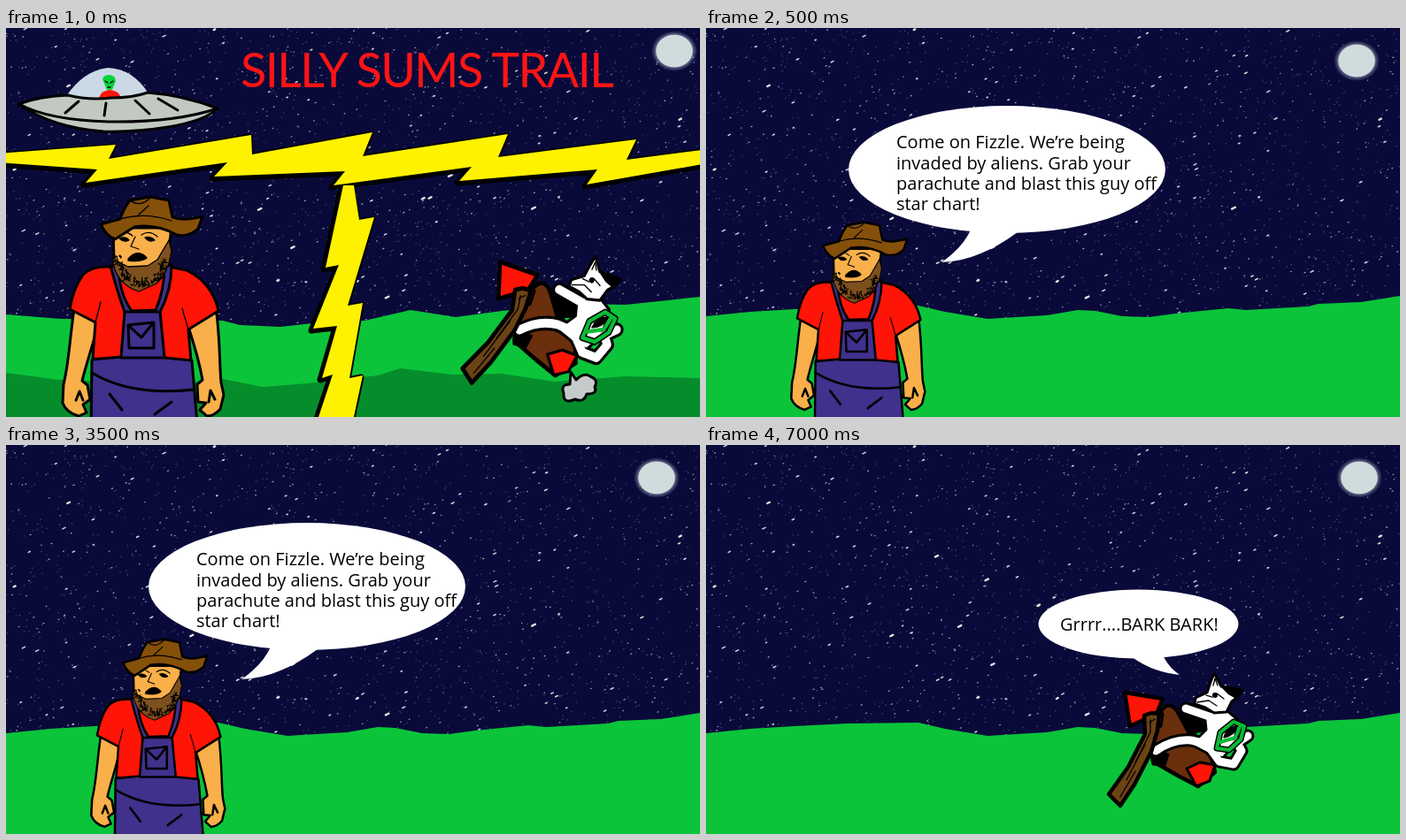
These frames come from a looping animation (784x440 px, 8 s). An HTML page:

```html
<!DOCTYPE html>
<html lang="en">
<head>
<meta charset="utf-8">
<title>Space cartoon</title>
<style>
  html, body { margin: 0; width: 100%; height: 100%; overflow: hidden; background: #0a0a3a; }
  svg { display: block; width: 100vw; height: 100vh; }
  .ink, .line { stroke: #000; stroke-width: 3; stroke-linejoin: round; stroke-linecap: round; }
  .line { fill: none; }
  .thin { stroke-width: 1.3; }
  .bold { stroke-width: 4.5; }
  .skin { fill: #f9b04a; }
  .shirt { fill: #ff1408; }
  .denim { fill: #3f318c; }
  .hat { fill: #855009; }
  .wood { fill: #6b4315; }
  .hull { fill: #6a2f0d; }
  .fur { fill: #fff; }
  .grass { fill: #0bc43a; }
  .speech { font: 20px "Open Sans", sans-serif; fill: #000; }
  .title { font: 54px Lato, sans-serif; letter-spacing: -1.6px; fill: #ff1414; }
</style>
</head>
<body>
<svg viewBox="0 0 784 440">
  <defs>
    <radialGradient id="glow">
      <stop offset=".78" stop-color="#cfdcdd"/>
      <stop offset=".82" stop-color="#a9b6c4" stop-opacity=".5"/>
      <stop offset="1" stop-color="#8792b0" stop-opacity="0"/>
    </radialGradient>

    <g id="sky">
      <rect width="784" height="440" fill="#0a0a3a"/>
      <g id="stars" fill="none" stroke-linecap="round"></g>
    </g>
    <ellipse id="moon" rx="26" ry="23" fill="url(#glow)"/>
    <path id="hills" class="grass" d="M0 326L50 321 100 318 160 315 240 314 270 321 318 329 350 327 385 325 420 319 440 320 470 326 500 327 530 323 590 317 610 319 680 315 692 312 740 310 784 303V440H0Z"/>

    <g id="bolt">
      <path d="M-9 142L124 132 116 148 277 121 278 143 414 118 403 145 567 120 556 146 712 126 701 149 793 137V153L656 177 668 160 512 173 526 157 370 178 383 162 235 168 250 152 90 175 103 160 -9 152Z"/>
      <path d="M381 178H393L399 217 416 214 386 314 403 311 388 396 403 393 391 449H350L369 392 357 396 374 337 347 340 376 268 361 271Z"/>
    </g>

    <g id="farmer" class="ink">
      <path class="skin" d="M77 318C72 350 71 380 65 403L64 424Q68 435 82 439L91 435 87 426 95 420 92 404 86 399C92 375 99 357 105 330Z"/>
      <path class="skin" d="M237 316C242 350 241 380 243 401L246 415 242 431Q235 439 227 439L219 432 226 424 217 423 216 403 222 398C218 376 213 359 205 335Z"/>
      <path class="line" d="M79 421L83 411 87 421M229 423L231 410 236 420"/>
      <path class="shirt" d="M124 271Q99 267 87 279 76 294 72 318L101 333 98 374 209 376 206 341 240 320Q233 288 204 274L184 270 151 292Z"/>
      <path class="line thin" d="M101 333L107 310M206 341L199 317"/>
      <path class="denim" d="M118 269Q127 302 134 321L130 372 97 375 96 460H217L210 376 179 373 174 321Q187 297 187 268L179 270Q179 297 169 319L142 320Q128 301 127 270Z"/>
      <path class="line" d="M134 321H174M130 373H180M138 336L167 333V362H139ZM139 337L153 350 166 334M97 390Q142 417 212 409M117 414L131 432M187 423L168 437"/>
      <path class="skin" d="M121 226L122 262 136 275H166L184 249 187 226Z"/>
      <path class="thin" fill="#7d501d" d="M120 260L130 266 138 270 160 269 171 262 184 240 187 252Q184 276 170 289L150 298Q123 289 120 260Z"/>
      <path class="line thin" id="beard"/>
      <path class="thin" d="M138 261Q149 249 159 260 153 265 138 263Z"/>
      <path class="line thin" d="M126 235Q133 227 143 235M153 234Q162 228 171 236M146 236L141 247 150 250"/>
      <path class="thin" d="M128 238Q135 235 139 240 133 243 128 238ZM157 237Q163 235 168 240 162 243 157 237Z"/>
      <path class="hat" d="M107 222L129 216Q133 204 140 195L163 191 184 195 188 214Q199 219 222 213L217 227Q206 237 193 234 169 221 145 225L123 239Q113 235 107 222Z"/>
      <path class="line thin" d="M129 216Q157 208 187 218M140 195Q152 204 164 191M149 212L161 201"/>
    </g>

    <g id="limbs" fill="none">
      <path d="M508 346Q528 332 548 334L574 340"/>
      <path d="M542 298L574 309"/>
      <path d="M570 344L580 358 596 361 605 346 600 337 612 329"/>
    </g>

    <g id="pilot" class="ink">
      <path class="hull bold" d="M514 301Q522 289 531 299L540 314 570 348 575 370 556 386 533 374 505 358Q499 326 514 301Z"/>
      <path d="M505 348L522 350 518 362 505 361ZM535 307L560 305 568 322 545 326Z"/>
      <path class="shirt" d="M509 300L516 304 514 318 506 322ZM543 366L558 359 575 362 569 380 554 386Z"/>
      <path class="shirt bold" d="M473 280L516 287 509 304 479 318Z"/>
      <use href="#limbs" stroke-width="15"/>
      <path class="fur" d="M563 302L588 300 600 310 597 338 584 354 567 349 548 339 565 322Z"/>
      <use href="#limbs" stroke="#fff" stroke-width="9"/>
      <path class="fur" d="M553 286L566 280 570 268 574 258 582 273 606 277 601 285 594 290 588 302 574 303 564 297 552 293Z"/>
      <path d="M584 274L606 277 598 285 591 281Z"/>
      <path class="line thin" d="M573 272L575 264 578 272M555 291L568 289 577 295M565 283L572 285M577 281L585 287"/>
      <circle cx="575" cy="283" r="1.500"/>
      <path d="M577 343L581 325 596 313 608 318 604 333 591 345Z" fill="none" stroke-width="7"/>
      <path d="M577 343L581 325 596 313 608 318 604 333 591 345ZM581 336L598 331 603 319" fill="none" stroke="#09bb36" stroke-width="4"/>
      <path class="thin" d="M585 331Q588 319 600 318 597 329 585 331Z"/>
      <path class="wood bold" d="M495 306L503 303 512 304 510 323 503 347 484 384 468 408 455 395 477 364 496 327Z"/>
      <path class="line thin" d="M502 311L502 325 485 359M496 339L475 379M485 369L468 398M501 314L507 310"/>
    </g>
  </defs>

  <g class="scene">
    <use href="#sky"/>
    <use href="#moon" x="755" y="26"/>
    <path class="grass" d="M0 324L62 329 245 331 264 336 310 338 355 333 405 331 457 319 508 327 560 320 640 312 700 313 784 304V440H0Z"/>
    <path fill="#058d2b" d="M0 390L60 398 200 402 245 397 290 406 340 402 420 393 445 385 505 392 560 391 620 400 700 394 784 396V440H0Z"/>
    <use href="#bolt" x="-2" y="2" stroke="#000" stroke-width="7" stroke-linejoin="round"/>
    <use href="#bolt" fill="#fff200"/>
    <g class="ink">
      <path fill="#cbd8e6" stroke="none" d="M68 77Q88 48 115 45 143 46 161 74L115 82Z"/>
      <path class="shirt" stroke="none" d="M105 79Q107 71 117 70 128 71 130 79Z"/>
      <path fill="#08d43b" stroke="none" d="M109 58Q110 53 117 53 124 54 124 60L120 70H114Z"/>
      <path class="thin" d="M112 60L115 62M121 60L118 62M115 67H118"/>
      <path fill="#c1c9c1" d="M14 86Q39 77 70 76 93 82 119 79 143 79 160 73 200 76 239 91 225 105 183 112 146 118 110 117 53 113 14 86Z"/>
      <path class="line" d="M15 86Q47 104 116 106 191 107 239 91M82 83L67 96M113 85L111 99M146 82L162 97M172 80L194 93"/>
    </g>
    <text class="title" x="265" y="67">SILLY SUMS TRAIL</text>
    <use href="#farmer"/>
    <path class="ink" fill="#c5cbcb" d="M638 389L644 398Q653 389 660 394 670 398 665 406 669 414 656 414 653 424 643 420 629 426 630 413 626 403 637 403Z"/>
    <use href="#pilot" transform="matrix(1.022 .174 -.209 1.077 133.2 -119.5)"/>
  </g>

  <g class="scene">
    <use href="#sky"/>
    <use href="#moon" x="735" y="37"/>
    <use href="#hills"/>
    <use href="#farmer" transform="matrix(.83 0 0 .855 43.2 56.5)"/>
    <path fill="#fff" d="M300 226Q291 248 266 265 307 264 352 231Z"/>
    <ellipse cx="340" cy="160" rx="179" ry="72" fill="#fff"/>
    <text class="speech">
      <tspan x="215" y="136">Come on Fizzle. We’re being</tspan>
      <tspan x="215" y="159.500">invaded by aliens. Grab your</tspan>
      <tspan x="215" y="183">parachute and blast this guy off</tspan>
      <tspan x="215" y="206">star chart!</tspan>
    </text>
  </g>

  <g class="scene">
    <use href="#sky"/>
    <use href="#moon" x="738" y="37"/>
    <use href="#hills"/>
    <path fill="#fff" d="M480 239Q504 257 535 260 521 250 516 237Z"/>
    <ellipse cx="488.500" cy="202.500" rx="113" ry="39" fill="#fff"/>
    <text class="speech" x="400" y="210">Grrrr....BARK BARK!</text>
    <use href="#pilot"/>
  </g>
</svg>
<script>
  let seed = 7;
  const random = () => (seed = seed * 16807 % 2147483647) / 2147483647;

  // Short slanted flecks; brighter groups are larger and rarer.
  const flecks = (count, length) => Array.from({ length: count }, () => {
    const x = random() * 784, y = random() * 345, size = length * (0.5 + random());
    return `M${x.toFixed(1)} ${y.toFixed(1)}l${size.toFixed(1)} ${(-size * 0.5).toFixed(1)}`;
  }).join('');

  document.getElementById('stars').innerHTML = [
    [1500, 0.4, 0.9, '#6d6e92'],
    [520, 0.8, 1.1, '#a9aabd'],
    [110, 2, 1.6, '#d3d6d8'],
    [18, 2.5, 2.4, '#e0e4e2']
  ].map(([count, length, width, color]) =>
    `<path d="${flecks(count, length)}" stroke="${color}" stroke-width="${width}"/>`).join('');

  // Whiskers follow the lower half of an ellipse around the chin.
  document.getElementById('beard').setAttribute('d', Array.from({ length: 70 }, () => {
    const angle = Math.PI * random(), radius = 0.7 + 0.25 * random();
    const x = 153 + 32 * radius * Math.cos(angle), y = 257 + 36 * radius * Math.sin(angle);
    return `M${x} ${y}q${random() * 6 - 3} 4 ${random() * 8 - 4} ${random() * 6}`;
  }).join(''));

  const scenes = [...document.querySelectorAll('.scene')];
  const sceneEnds = [500, 5500, 8000];
  const start = performance.now();

  function draw() {
    const time = (performance.now() - start) % 8000;
    const current = sceneEnds.findIndex(end => time < end);
    scenes.forEach((scene, i) => { scene.style.display = i === current ? '' : 'none'; });
    requestAnimationFrame(draw);
  }
  draw();
</script>
</body>
</html>
```
